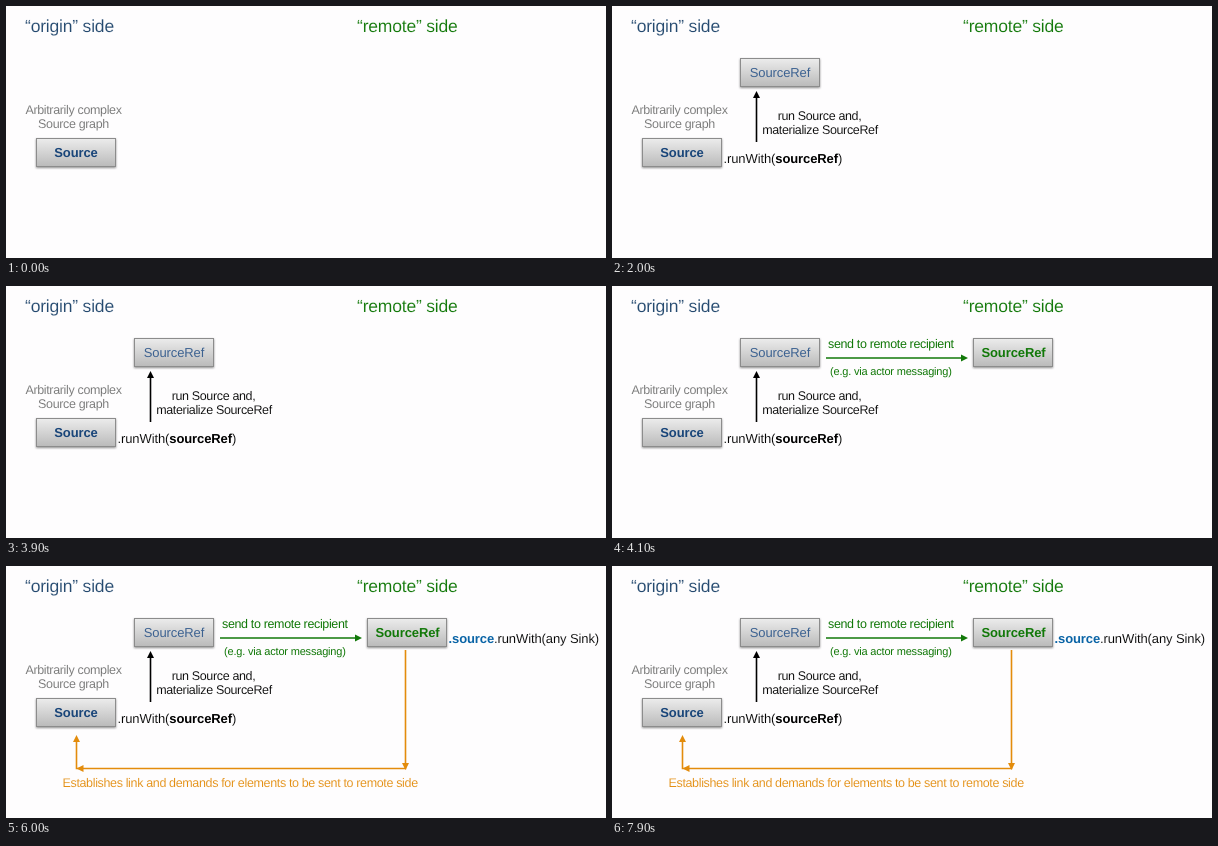
Write an HTML page that moves like this. It is 600 px wide and 252 px high and loops after 8 s.

```html
<!DOCTYPE html>
<html lang="en">
<head>
<meta charset="utf-8">
<title>SourceRef</title>
<style>
  html, body { margin: 0; width: 100%; height: 100%; overflow: hidden; background: #fefdfe; }
  svg { display: block; width: 600px; height: 252px; }
  text {
    font: 12.5px "Liberation Sans", Arial, sans-serif;
    letter-spacing: -.028em;
    text-rendering: geometricPrecision;
  }
  .light { stroke: #fefdfe; stroke-width: .12px; }
  .title { font-size: 17.5px; letter-spacing: -.011em; }
  .code { font-size: 13px; letter-spacing: -.008em; }
  .small { font-size: 11px; letter-spacing: -.017em; }
  .mid { text-anchor: middle; }
  .bold { font-weight: bold; stroke: none; }
  .box { fill: url(#metal); stroke: #8c8c8c; filter: url(#shadow); }
  .line { fill: none; stroke-width: 1.6; }
  .blue { fill: #24496f; }
  .gray { fill: #707070; }
  .green { fill: #117808; }
  .orange { fill: #e38c0c; }
  .step { visibility: hidden; }
</style>
</head>
<body>
<svg viewBox="0 0 600 252">
  <defs>
    <linearGradient id="metal" x1="0" y1="0" x2="0" y2="1">
      <stop offset="0" stop-color="#ececec"/>
      <stop offset="1" stop-color="#bababa"/>
    </linearGradient>
    <filter id="shadow" x="-10%" y="-20%" width="120%" height="150%">
      <feDropShadow dx="0" dy="1" stdDeviation="1" flood-opacity=".45"/>
    </filter>
  </defs>

  <text class="title light blue" x="19" y="26">“origin” side</text>
  <text class="title light green" x="351" y="26">“remote” side</text>
  <text class="light gray mid" x="67.5" y="108">Arbitrarily complex</text>
  <text class="light gray mid" x="67.5" y="122">Source graph</text>
  <rect class="box" x="30.5" y="132.5" width="79" height="28"/>
  <text class="code bold mid" x="70" y="151" fill="#194579">Source</text>

  <g class="step">
    <rect class="box" x="128.5" y="52.5" width="79" height="28"/>
    <text class="code mid" x="168" y="71" fill="#3d6291">SourceRef</text>
    <path class="line" d="M144.5 136V90" stroke="#000"/>
    <path d="M144.5 85l3.5 7h-7z"/>
    <text class="light mid" x="207.5" y="114">run Source and,</text>
    <text class="light mid" x="208" y="128">materialize SourceRef</text>
    <text class="code light" x="111.5" y="157">.runWith(<tspan class="bold">sourceRef</tspan>)</text>
  </g>

  <g class="step">
    <text class="green" x="216" y="62">send to remote recipient</text>
    <text class="small green" x="218" y="89">(e.g. via actor messaging)</text>
    <path class="line" d="M214 72H350" stroke="#117808"/>
    <path class="green" d="M356 72l-7 3.5v-7z"/>
    <rect class="box" x="361.5" y="52.5" width="79" height="28"/>
    <text class="code bold green mid" x="401.5" y="71">SourceRef</text>
  </g>

  <g class="step">
    <text class="code light" x="442.5" y="77"><tspan class="bold" fill="#0a64a6">.source</tspan>.runWith(any Sink)</text>
    <path class="line" d="M399.5 84V202.5H70.5V174" stroke="#e38c0c"/>
    <path class="orange" d="M399.5 204l-3.5-7h7zM70.5 202.5l7-3.5v7zM70.5 169l3.5 7h-7z"/>
    <text class="light orange" x="56.5" y="221">Establishes link and demands for elements to be sent to remote side</text>
  </g>
</svg>
<script>
  const LOOP = 8000, STEP = 2000;
  const steps = document.querySelectorAll('.step');
  const start = performance.now();

  function draw(now) {
    const t = Math.max(0, now - start) % LOOP;
    steps.forEach((g, i) => {
      g.style.visibility = t >= (i + 1) * STEP ? 'visible' : 'hidden';
    });
    requestAnimationFrame(draw);
  }
  draw(start);
</script>
</body>
</html>
```
